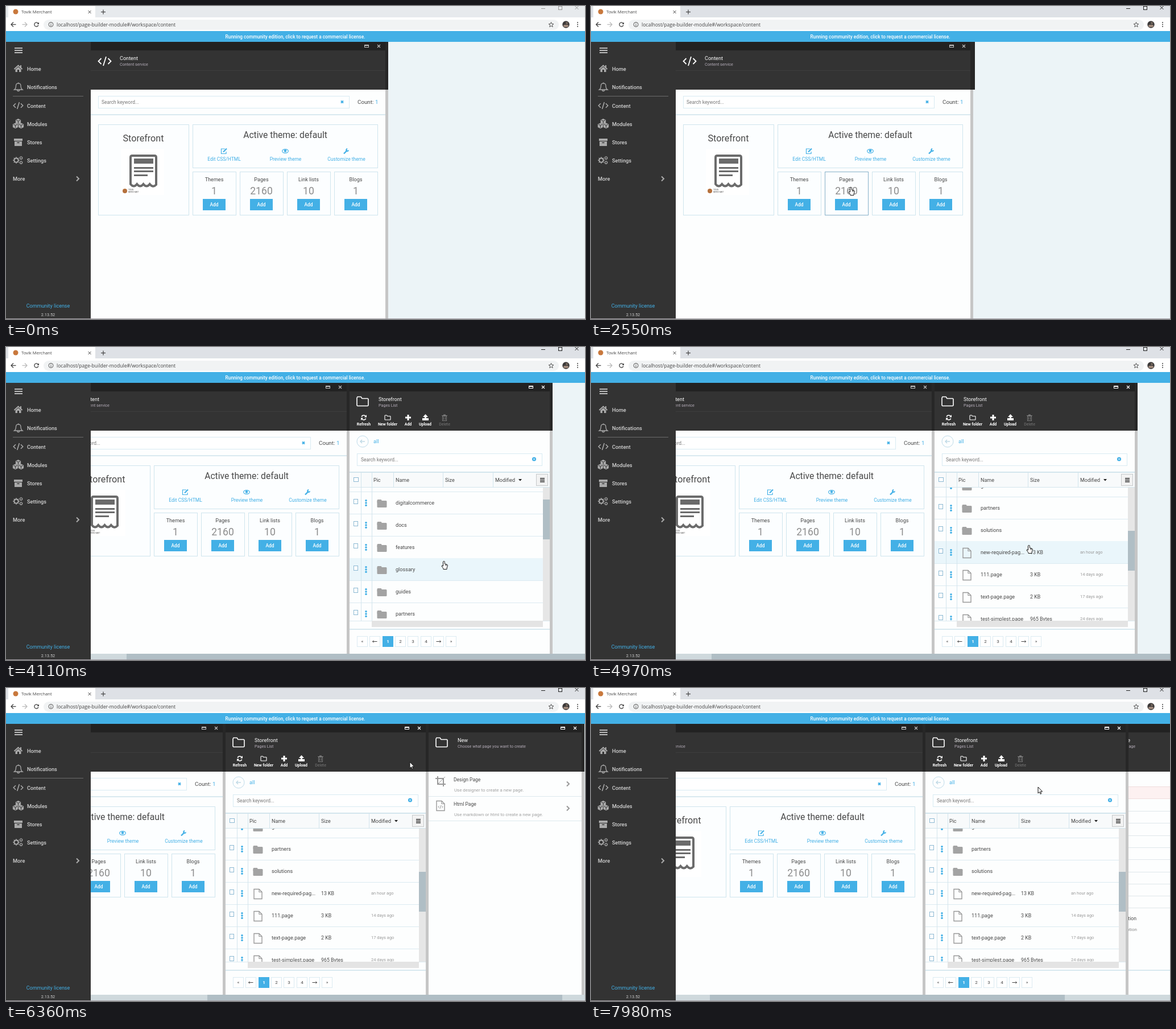
Recreate the animation shown at these times as an HTML page with a canvas. Size 1018x550 px, loop 8000 ms.

```html
<!DOCTYPE html>
<html lang="en">
<head>
<meta charset="utf-8">
<title>Content workspace</title>
<style>
html, body { margin: 0; width: 100%; height: 100%; overflow: hidden; background: #fff; }
canvas { display: block; width: 1018px; height: 550px; }
</style>
</head>
<body>
<canvas id="stage" width="1018" height="550"></canvas>
<script>
const c = document.getElementById('stage').getContext('2d');
const LOOP = 8000;
const UI = 'Roboto, "Noto Sans", sans-serif', CHROME = '"Open Sans", "Noto Sans", sans-serif';
const BLUE = '#43b0e6', EDGE = '#cfe5ee', INK = '#484848';

const STEPS = [[930, 1460, 8], [1760], [1930, 2000, 2], [2230], [2400, 2550, 3], [2780], [3090],
  [3240, 3320, 2], [3470, 3720, 4], [3940, 4720, 11], [4970, 5730, 11], [5810],
  [5960, 6740, 11], [6830, 7050, 4], [7680], [7820, 7980, 3]];

// Pointer path: time, x, y
const PATH = [[930, 815, 537], [1460, 457, 318], [3320, 457, 318], [3470, 463, 319], [3720, 776, 369],
  [3940, 770, 376], [4720, 770, 376], [4970, 770, 348], [5730, 710, 130], [6400, 710, 130],
  [6740, 770, 157], [7050, 786, 174]];

const CLICKS = [[1760, 1930], [5810, 5960], [7680, 7820]];

const FILES = [['assets'], ['blogs'], ['digitalcommerce'], ['docs'], ['features'], ['glossary'],
  ['guides'], ['partners'], ['solutions'],
  ['new-required-pag...', '13 KB', 'an hour ago'], ['111.page', '3 KB', '14 days ago'],
  ['text-page.page', '2 KB', '17 days ago'], ['test-simplest.page', '965 Bytes', '24 days ago']];

const clamp = v => Math.max(0, Math.min(1, v));
const swing = v => 0.5 - 0.5 * Math.cos(Math.PI * clamp(v));

function snap(t) {
  let r = 0;
  for (const [a, b = a, n = 1] of STEPS) {
    if (t < a) break;
    const d = n > 1 ? (b - a) / (n - 1) : 1;
    r = a + Math.min(n - 1, Math.floor((t - a) / d + 0.01)) * d;
  }
  return r;
}

function pointer(t) {
  if (t < PATH[0][0]) return null;
  for (let i = 1; i < PATH.length; i++) {
    const [a, x, y] = PATH[i - 1], [b, u, v] = PATH[i];
    if (t <= b) {
      const p = (t - a) / (b - a);
      return { x: x + (u - x) * p, y: y + (v - y) * p };
    }
  }
  const [, x, y] = PATH[PATH.length - 1];
  return { x, y };
}

function sideScroll(t) {
  if (t < 5960) return Math.round(68 * clamp((t - 3160) / 160));
  return Math.round(68 + 274 * swing((t - (t < 7820 ? 6070 : 7918)) / 400));
}

// Drawing helpers
function rect(x, y, w, h, col) { c.fillStyle = col; c.fillRect(x, y, w, h); }
function box(x, y, w, h, edge, fill) {
  if (fill) rect(x, y, w, h, fill);
  c.strokeStyle = edge; c.lineWidth = 1;
  c.strokeRect(x + 0.5, y + 0.5, w - 1, h - 1);
}
function trace(pts) {
  c.beginPath();
  for (let i = 0; i < pts.length; i += 2) c.lineTo(pts[i], pts[i + 1]);
}
function line(col, w, ...pts) { trace(pts); c.strokeStyle = col; c.lineWidth = w; c.stroke(); }
function poly(col, ...pts) { trace(pts); c.closePath(); c.fillStyle = col; c.fill(); }
function disc(x, y, r, col) { c.beginPath(); c.arc(x, y, r, 0, 7); c.fillStyle = col; c.fill(); }
function ring(x, y, r, col, w = 1, a = 0, b = 7) {
  c.beginPath(); c.arc(x, y, r, a, b); c.strokeStyle = col; c.lineWidth = w; c.stroke();
}
function pill(x, y, w, h, r, col) { c.beginPath(); c.roundRect(x, y, w, h, r); c.fillStyle = col; c.fill(); }
function text(s, x, y, size, col = INK, align = 'left', weight = 400, font = UI) {
  c.font = `${weight} ${size}px ${font}`;
  c.textAlign = align; c.fillStyle = col;
  c.fillText(s, x, y + size * 0.35);
}
function cross(x, y, r, col, w) {
  line(col, w, x - r, y - r, x + r, y + r);
  line(col, w, x - r, y + r, x + r, y - r);
}
function bars(x, y, w, gap, h, col) { for (let i = 0; i < 3; i++) rect(x, y + i * gap, w, h, col); }
function chevron(x, y, col, r = 4) { line(col, 2, x - r / 2, y - r, x + r / 2, y, x - r / 2, y + r); }
function clipTo(x, y, w, h, draw) {
  c.save(); c.beginPath(); c.rect(x, y, w, h); c.clip(); draw(); c.restore();
}

// Icons, placed by centre
function codeIcon(x, y, k, col, w) {
  line(col, w, x - 6 * k, y - 5 * k, x - 11 * k, y, x - 6 * k, y + 5 * k);
  line(col, w, x + 6 * k, y - 5 * k, x + 11 * k, y, x + 6 * k, y + 5 * k);
  line(col, w, x + 2.5 * k, y - 8 * k, x - 2.5 * k, y + 8 * k);
}
function folderLine(x, y, k, col, w) {
  c.beginPath();
  c.moveTo(x - 10 * k, y - 6 * k);
  for (const [a, b] of [[-9, -8], [-3, -8], [-1, -5], [9, -5], [10, -4], [10, 7], [9, 8], [-9, 8], [-10, 7]])
    c.lineTo(x + a * k, y + b * k);
  c.closePath(); c.strokeStyle = col; c.lineWidth = w; c.stroke();
}
function folderSolid(x, y) {
  pill(x - 8.5, y - 7, 8, 6, 1.5, '#a3a3a3');
  pill(x - 8.5, y - 5, 17, 12, 1.5, '#a3a3a3');
}
function fileIcon(x, y) {
  trace([x - 7, y - 8.5, x + 2, y - 8.5, x + 7, y - 3.5, x + 7, y + 8.5, x - 7, y + 8.5]);
  c.closePath(); c.strokeStyle = '#999'; c.lineWidth = 1.4; c.stroke();
  line('#999', 1.2, x + 2, y - 8.5, x + 2, y - 3.5, x + 7, y - 3.5);
}
function cog(x, y, r, col) {
  ring(x, y, r, col, r * 0.55);
  for (let i = 0; i < 8; i++) {
    const a = i * Math.PI / 4, u = Math.cos(a), v = Math.sin(a);
    line(col, r * 0.42, x + u * r, y + v * r, x + u * r * 1.6, y + v * r * 1.6);
  }
}
function cube(x, y, col) {
  poly(col, x, y - 5, x + 4.6, y - 2.8, x + 4.6, y + 2.4, x, y + 4.8, x - 4.6, y + 2.4, x - 4.6, y - 2.8);
  line('#333', 1, x - 3.5, y - 2.4, x, y - 0.8, x + 3.5, y - 2.4);
  line('#333', 1, x, y - 0.8, x, y + 3.5);
}

function browser(active) {
  rect(0, 0, 1018, 20, active ? '#dee1e6' : '#e7eaed');
  pill(4, -8, 153, 40, 6, '#fff');
  rect(0, 20, 1018, 24, '#fff');
  disc(17, 10, 4.5, '#c8783c');
  text('Tovik Merchant', 27, 10, 7.6, '#444', 'left', 400, CHROME);
  cross(147, 10.5, 2.5, '#444', 1);
  line('#444', 1.2, 167, 10.5, 175, 10.5); line('#444', 1.2, 171, 6.5, 171, 14.5);
  const ctl = active ? '#222' : '#999';
  line(ctl, 1, 941, 4.5, 948, 4.5);
  box(971, 0, 7, 7, ctl);
  cross(1003.5, 3, 3, ctl, 1);
  pill(66, 24, 906, 18, 9, '#f1f3f4');
  for (const [x, d, col] of [[13, 1, '#444'], [33, -1, '#bbb']]) {
    line(col, 1.3, x - 4 * d, 32.5, x + 4.5 * d, 32.5);
    line(col, 1.3, x, 28.5, x - 4 * d, 32.5, x, 36.5);
  }
  ring(53.5, 32.5, 3.6, '#444', 1.3, 0.3, 5.6);
  poly('#444', 54.5, 32, 58, 32, 58, 28.5);
  ring(79, 32.5, 4, '#555', 1);
  rect(78.5, 32, 1, 3, '#555'); rect(78.5, 30, 1, 1, '#555');
  text('localhost/page-builder-module#/workspace/content', 89, 33, 8.6, '#444', 'left', 400, CHROME);
  const star = [];
  for (let i = 0; i < 10; i++) {
    const a = i * Math.PI / 5 - Math.PI / 2, r = i % 2 ? 2 : 4.6;
    star.push(958.5 + r * Math.cos(a), 33 + r * Math.sin(a));
  }
  trace(star); c.closePath(); c.strokeStyle = '#555'; c.lineWidth = 1; c.stroke();
  disc(984.5, 32.5, 6.2, '#3d3a3a');
  pill(980, 33, 9, 4, 2, '#a08a7c');
  disc(986, 30, 2, '#77695f');
  for (let i = -1; i < 2; i++) disc(1005, 32.5 + i * 3.6, 1, '#444');
  rect(0, 44, 1018, 19, BLUE);
  text('Running community edition, click to request a commercial license.', 508.5, 54, 8.3, '#fff', 'center', 500);
}

function sidebar() {
  const g = '#aaa';
  rect(0, 63, 149, 487, '#333');
  bars(15, 73, 14, 4, 2, '#bbb');
  ['Home', 'Notifications', 'Content', 'Modules', 'Stores', 'Settings'].forEach((s, i) =>
    text(s, 37, 111 + i * 32.2, 9.2, '#d2d2d2', 'left', 500));
  line(g, 2, 14.5, 111, 21.5, 104.5, 28.5, 111);
  poly(g, 21.5, 107, 26.5, 111.5, 26.5, 116, 23, 116, 23, 112, 20, 112, 20, 116, 16.5, 116, 16.5, 111.5);
  rect(25, 104, 2, 4, g);
  c.beginPath();
  c.moveTo(14.5, 147); c.quadraticCurveTo(17.5, 145, 17.5, 140);
  c.bezierCurveTo(17.5, 134.5, 26, 134.5, 26, 140); c.quadraticCurveTo(26, 145, 29, 147);
  c.closePath(); c.strokeStyle = g; c.lineWidth = 1.3; c.stroke();
  ring(21.7, 147.5, 2, g, 1.3, 0, Math.PI); rect(21, 134.5, 1.5, 2, g);
  rect(12, 158, 124, 1, '#6a6a6a');
  codeIcon(21.5, 175, 0.75, g, 1.5);
  cube(21.5, 203, g); cube(16.5, 210.5, g); cube(26.5, 210.5, g);
  rect(14, 233, 15, 4, g); rect(15, 238, 13, 8, g); rect(19.5, 239.5, 4, 1.5, '#333');
  cog(18, 271, 3.6, g); cog(26.5, 267, 2, g); cog(26.5, 275, 2, g);
  text('More', 12, 304, 9.2, '#d2d2d2', 'left', 500);
  chevron(126, 303.5, '#aaa');
  text('Community license', 74, 527, 9, BLUE, 'center');
  text('2.13.52', 74, 542, 7.3, '#d0d0d0', 'center');
}

function frame(x, w, bottom) {
  rect(x, 63, w, 15, '#222');
  rect(x, 78, w, 69, '#333');
  rect(x, 147, w, bottom - 147, '#fdfefe');
  rect(x + w, 63, 5, 84, '#272727');
  rect(x + w, 147, 5, bottom - 147, '#c6c6c6');
}
function heading(x, w, title, sub, bright) {
  const col = bright ? '#fff' : '#c4c4c4', r = x + w;
  box(r - 37, 68, 8, 5, col); rect(r - 37, 68, 8, 2, col);
  cross(r - 11.5, 70.5, 2.5, col, 1.1);
  text(title, x + 51, 91.5, 9.1, '#fff');
  text(sub, x + 51, 102.5, 7.2, '#b5adb9');
}

function receipt(x, y) {
  const g = '#6b6b6b';
  rect(x - 15, y - 10, 76, 81, '#fff');
  c.beginPath();
  c.moveTo(x + 2, y + 53); c.lineTo(x + 2, y + 5);
  c.quadraticCurveTo(x + 2, y + 2, x + 5, y + 2);
  c.lineTo(x + 44, y + 2); c.quadraticCurveTo(x + 47, y + 2, x + 47, y + 5);
  c.lineTo(x + 47, y + 53);
  for (let i = 4; i > 0; i--) c.quadraticCurveTo(x + 2 + 11.25 * (i - 0.5), y + 59, x + 2 + 11.25 * (i - 1), y + 52);
  c.strokeStyle = g; c.lineWidth = 4; c.stroke();
  rect(x + 8, y + 7, 34, 9, g);
  rect(x + 8, y + 22, 34, 3, g); rect(x + 8, y + 28, 34, 3, g); rect(x + 8, y + 35, 24, 3, g);
  disc(x - 8, y + 64, 4, '#b5713d');
  text('TOVIK', x - 2, y + 62, 3.4, '#555'); text('MERCHANT', x - 2, y + 66, 3.4, '#555');
}

function contentBlade(x, bottom, hot) {
  frame(x, 518, bottom);
  heading(x, 518, 'Content', 'Content service', false);
  rect(x, 113, 518, 1, '#3d3d3d');
  codeIcon(x + 24.5, 97, 1, '#fff', 1.8);
  box(x + 13, 158, 442, 22, '#d8ebf3', '#fff');
  text('Search keyword...', x + 19, 169, 8.4, '#777');
  cross(x + 442, 168.5, 2, BLUE, 2);
  text('Count:', x + 469, 169, 9.8);
  text('1', x + 505.5, 169, 9.8, BLUE, 'right');
  rect(x, 190, 518, 2, '#d9e9f0');
  box(x + 13, 208, 160, 160, EDGE, '#fcfeff');
  text('Storefront', x + 92.5, 232, 16.1, INK, 'center');
  receipt(x + 68, 261);
  box(x + 179, 208, 326, 77, EDGE, '#fcfeff');
  text('Active theme: default', x + 342, 227, 15.7, INK, 'center');

  const a = x + 234, b = x + 342, d = x + 449;
  line(BLUE, 1.2, a + 2, 251, a - 4.5, 251, a - 4.5, 259.5, a + 4, 259.5, a + 4, 256);
  line(BLUE, 2.2, a - 1, 256.5, a + 5, 250.5);
  c.beginPath(); c.ellipse(b, 255, 5.3, 3.4, 0, 0, 7); c.strokeStyle = BLUE; c.lineWidth = 1.2; c.stroke();
  disc(b, 254.5, 2.3, BLUE);
  line(BLUE, 2.4, d - 4, 259.5, d + 2, 253.5); ring(d + 2.2, 253, 2, BLUE, 2, 0.2, 4.7);
  [['Edit CSS/HTML', a], ['Preview theme', b], ['Customize theme', d]].forEach(([s, u]) =>
    text(s, u + 0.5, 269.5, 8.5, BLUE, 'center'));

  [['Themes', '1'], ['Pages', '2160'], ['Link lists', '10'], ['Blogs', '1']].forEach(([s, n], i) => {
    const u = x + 179 + i * 83, m = u + 38;
    box(u, 291, 77, 77, i === hot ? '#86b0c9' : EDGE, '#fcfeff');
    text(s, m, 305, 9.1, INK, 'center');
    text(n, m, 324.5, 17.6, '#8c8c8c', 'center');
    rect(m - 20, 339, 40, 20, BLUE);
    text('Add', m, 349, 8.3, '#fff', 'center', 500);
  });
}

function tools(x) {
  const w = '#fff';
  [['Refresh', 25], ['New folder', 67], ['Add', 103], ['Upload', 133], ['Delete', 167]].forEach(([s, d]) =>
    text(s, x + d, 135.5, 7, s === 'Delete' ? '#777' : w, 'center', s === 'Delete' ? 400 : 700));
  ring(x + 25, 124, 4, w, 1.7, 3.5, 5.9); ring(x + 25, 124, 4, w, 1.7, 0.4, 2.8);
  poly(w, x + 30, 119, x + 30, 123.5, x + 26, 123.5); poly(w, x + 20, 129, x + 20, 124.5, x + 24, 124.5);
  folderLine(x + 67, 124, 0.5, w, 1.1);
  rect(x + 98, 122.5, 10, 3, w); rect(x + 101.5, 119, 3, 10, w);
  rect(x + 128, 125, 11, 4, w); rect(x + 132, 121, 3, 6, w);
  poly(w, x + 129, 123, x + 133.5, 118, x + 138, 123);
  box(x + 163, 121, 8, 9, '#777'); rect(x + 162, 120, 10, 1, '#777'); rect(x + 165, 118.5, 4, 1.5, '#777');
  rect(x + 165, 123, 1, 5, '#777'); rect(x + 168, 123, 1, 5, '#777');
}

function listBlade(x, bottom, loaded, top, hot) {
  frame(x, 352, bottom);
  if (!loaded) return;
  heading(x, 352, 'Storefront', 'Pages List', true);
  folderLine(x + 23, 95.5, 1, '#fff', 1.6);
  tools(x);
  ring(x + 23, 166, 10, '#bfdcea');
  line('#b9d6e4', 1.3, x + 27, 166, x + 19, 166); line('#b9d6e4', 1.3, x + 22, 163, x + 19, 166, x + 22, 169);
  text('all', x + 42, 165.5, 9.2, BLUE);
  box(x + 13, 187, 326, 22, '#d8ebf3', '#fff');
  text('Search keyword...', x + 20, 198, 8.4, '#777');
  disc(x + 324.5, 197, 3.6, BLUE); cross(x + 324.5, 197, 1.2, '#fff', 1);

  rect(x, 219, 352, 28, '#f8fafb');
  rect(x, 219, 352, 2, '#d3e5ed'); rect(x, 246, 352, 1, '#d3e5ed');
  for (const d of [20, 39, 77, 164, 252]) rect(x + d, 220, 1, 27, '#d3e5ed');
  box(x + 7, 229, 9, 8, '#8db9d3', '#fff');
  [['Pic', 42], ['Name', 81], ['Size', 168], ['Modified', 256]].forEach(([s, d]) => text(s, x + d, 233.5, 9));
  poly('#222', x + 297, 232, x + 303, 232, x + 300, 235.5);
  box(x + 328, 223, 21, 21, '#c5c9cb', '#f2f2f2');
  bars(x + 335, 230, 8, 3, 1.6, '#333');

  clipTo(x, 247, 340, 234, () => {
    FILES.forEach(([name, size, when], i) => {
      const y = 246 + i * 39 - top, m = y + 19;
      if (y > 481 || y < 207) return;
      if (i === hot) rect(x, y, 340, 39, '#eaf6fb');
      rect(x, y + 39, 340, 1, '#dbeaf1');
      box(x + 7, m - 6, 8, 9, '#8db9d3', '#fff');
      for (let k = -1; k < 2; k++) disc(x + 29, m + 1 + k * 4.2, 1.8, BLUE);
      (size ? fileIcon : folderSolid)(x + 57, m + 2);
      text(name, x + 81, m + 0.5, 9.1);
      if (size) { text(size, x + 168, m + 0.5, 8.8); text(when, x + 256, m + 0.5, 7.5, '#999'); }
    });
    rect(x + 20, 247, 1, 234, '#d3e5ed'); rect(x + 39, 247, 1, 234, '#d3e5ed');
  });
  rect(x + 340, 247, 12, 235, '#e6e6e6');
  rect(x + 340, 247 + Math.round(top * 0.298), 12, 70, '#b0bec5');
  rect(x, 481, 352, 1, '#dbeaf1');
  rect(x + 39, 481, 301, 11, '#e4e4e4');
  rect(x, 495, 352, 2, '#d9e9f0');
  ['«', '←', '1', '2', '3', '4', '→', '»'].forEach((s, i) => {
    const u = Math.round(x + 13 + i * 22.3), on = i === 2;
    box(u, 508, 19, 19, on ? BLUE : '#dcebf2', on ? BLUE : '#fff');
    if (s === '←' || s === '→') {
      const d = s === '←' ? -1 : 1, m = u + 9.5;
      line(INK, 1, m - 4, 517.5, m + 4, 517.5);
      line(INK, 1, m + 2 * d, 515.5, m + 4 * d, 517.5, m + 2 * d, 519.5);
    } else text(s, u + 9.5, 517.5, 8, on ? '#fff' : INK, 'center', on ? 700 : 400);
  });
}

function newBlade(x, bottom, hot) {
  frame(x, 269, bottom);
  heading(x, 269, 'New', 'Choose what page you want to create', true);
  folderLine(x + 23, 95.5, 1, '#fff', 1.6);
  if (hot) rect(x, 147, 269, 43, '#eaf6fb');
  rect(x, 190, 269, 1, '#dde9ee'); rect(x, 233, 269, 1, '#dde9ee');
  const g = hot > 0.4 ? '#86a9c0' : '#999', k = x + 21;
  line(g, 2, k - 5, 155, k - 5, 169, k + 9, 169);
  line(g, 2, k - 9, 159, k + 5, 159, k + 5, 173);
  line(g, 1, k - 4, 168, k + 8, 156);
  fileIcon(k, 207); codeIcon(k, 209, 0.38, '#999', 1);
  text('Design Page', x + 44, 161, 8.5); text('Html Page', x + 44, 204, 8.5);
  text('Use designer to create a new page.', x + 45, 179.5, 7.9, '#a0a0a0');
  text('Use markdown or html to create a new page.', x + 45, 222, 7.9, '#a0a0a0');
  chevron(x + 245 + 4 * hot, 168.5, '#999'); chevron(x + 245, 211.5, '#999');
}

function formBlade(x, bottom) {
  frame(x, 269, bottom);
  heading(x, 269, 'Design page', 'Create a new page', true);
  rect(x, 173, 269, 22, '#fdf1f1'); rect(x, 173, 269, 1, '#f0dcdc'); rect(x, 194, 269, 1, '#f0dcdc');
  for (let y = 216; y < 390; y += 21.3) rect(x, Math.round(y), 269, 1, '#dfe6ea');
  text('Description', x + 112, 405, 8.7, INK, 'right');
  text('Page description', x + 113, 424.5, 8, '#888', 'right');
  rect(x, 495, 269, 2, '#d9e9f0');
}

function cursor({ x, y }, hand) {
  c.save();
  c.translate(Math.round(x), Math.round(y));
  c.beginPath();
  if (hand) {
    c.moveTo(-1.5, 9); c.lineTo(-1.5, 1.2);
    c.quadraticCurveTo(0, -0.6, 1.3, 1.2);
    c.lineTo(1.3, 5); c.lineTo(5.4, 6.2); c.quadraticCurveTo(6.6, 6.8, 6.4, 8.5);
    c.lineTo(5.2, 12); c.lineTo(5, 14.6); c.lineTo(-1, 14.6); c.lineTo(-1.4, 12.6);
    c.lineTo(-4.2, 8.8); c.quadraticCurveTo(-3.6, 7, -1.5, 9);
  } else {
    for (const [a, b] of [[0, 0], [0, 11], [2.5, 8.7], [4.2, 12.3], [5.8, 11.6], [4.2, 8], [7.6, 8]]) c.lineTo(a, b);
  }
  c.closePath();
  c.fillStyle = '#fff'; c.fill();
  c.strokeStyle = '#111'; c.lineWidth = 1; c.stroke();
  if (hand) for (let i = 0; i < 2; i++) line('#111', 0.8, 2.8 + i * 1.9, 6, 2.8 + i * 1.9, 8.5);
  c.restore();
}

function draw(now) {
  const t = snap(now % LOOP + 0.5);
  const shift = sideScroll(t), x1 = 149 - shift, x2 = x1 + 523, x3 = x2 + 357;
  const top = Math.round(256 * clamp((t - 3862) / 858));
  const total = t < 2780 ? 869 : t < 5960 ? 937 : 1211;
  const bottom = total > 869 ? 539 : 550;
  const p = pointer(t);
  const over = (x, y, w, h) => !!p && p.x >= x && p.x < x + w && p.y >= y && p.y < y + h;

  let card = -1;
  const hoverX = t < 3470 ? 149 : x1;
  for (let i = 0; i < 4; i++) if (over(hoverX + 179 + i * 83, 291, 77, 77)) card = i;
  const row = t >= 3090 && over(x2, 247, 340, 234) ? Math.floor((p.y - 246 + top) / 39) : -1;
  const onAdd = t >= 3090 && over(x2 + 88, 117, 30, 24);
  const onDesign = t > 6200 && t < 7820 && over(x3, 147, 269, 43);

  browser(t >= 1760);
  rect(149, 63, 869, 487, '#ecf4f7');
  clipTo(149, 63, 869, 487, () => {
    if (t >= 5960) {
      const start = t < 7820 ? 5960 : 7820;
      const x = x3 - Math.round(271 * (1 - clamp((t - start) / 250)));
      if (t < 7820) newBlade(x, bottom, onDesign ? 0.01 + 0.99 * clamp((t - 6740) / 310) : 0);
      else formBlade(x, bottom);
    }
    if (t >= 2780) listBlade(x2, bottom, t >= 3090, top, row);
    else if (t >= 2230) rect(672, 63, 3, 84, '#272727');
    contentBlade(x1, bottom, card);
    if (total > 869) {
      rect(149, 539, 869, 10, '#cfd9dd');
      rect(Math.round(149 + shift * 869 / total), 539, Math.round(869 * 869 / total), 10, '#b0bec5');
    }
  });
  sidebar();
  rect(0, 549, 1018, 1, '#a39fa5');
  if (p) {
    cursor(p, card >= 0 || row >= 0 || onAdd || onDesign);
    if (CLICKS.some(([a, b]) => t >= a && t < b)) disc(p.x, p.y, 8, 'rgba(255, 235, 60, 0.4)');
  }
}

const begin = performance.now();
function tick() {
  draw(performance.now() - begin);
  requestAnimationFrame(tick);
}
tick();
</script>
</body>
</html>
```
